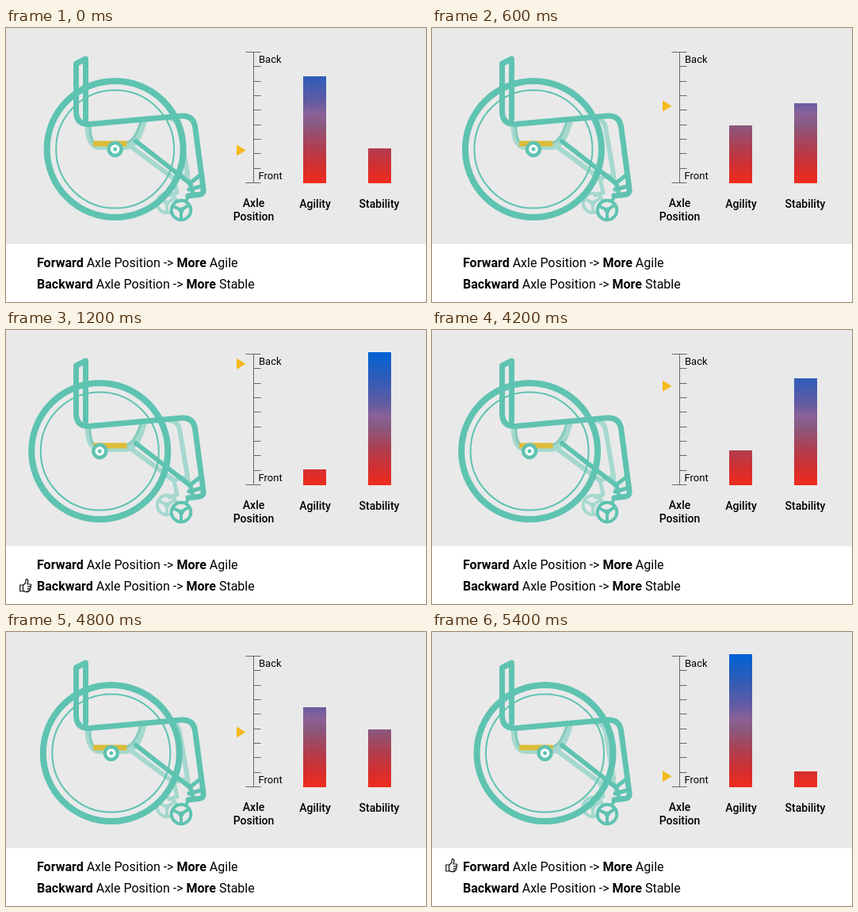
An HTML page that plays this animation: 530x346 px, repeating every 8.4 s.

```html
<!DOCTYPE html>
<html lang="en">
<head>
<meta charset="utf-8">
<title>Axle position</title>
<style>
  html, body { margin: 0; width: 100%; height: 100%; overflow: hidden; background: #fff; }
  svg { display: block; width: 530px; height: 346px; font-family: Roboto, sans-serif; }
  .line { fill: none; stroke-linejoin: round; stroke-linecap: round; }
  .near { stroke: #5fc3b1; }
  .far { stroke: #a5d8ce; }
  .label { font-size: 14px; font-weight: 500; text-anchor: middle; }
  .scale { font-size: 13px; }
  .rule { font-size: 16px; }
  .rule tspan { font-weight: 700; }
</style>
</head>
<body>
<svg viewBox="0 0 530 346">
  <defs>
    <linearGradient id="heat" gradientUnits="userSpaceOnUse" x1="0" y1="28" x2="0" y2="196">
      <stop offset="0" stop-color="#0062d4"/>
      <stop offset=".2" stop-color="#315cb8"/>
      <stop offset=".38" stop-color="#605ba3"/>
      <stop offset=".48" stop-color="#8a6298"/>
      <stop offset=".57" stop-color="#8a587e"/>
      <stop offset=".74" stop-color="#b23d4d"/>
      <stop offset=".88" stop-color="#d42e2f"/>
      <stop offset="1" stop-color="#f02c1e"/>
    </linearGradient>
    <g id="castor" class="line" stroke-width="4">
      <circle r="12.3"/>
      <path d="M0 0V11M0 0L-10-5M0 0L9-6"/>
      <circle r="1.5"/>
    </g>
  </defs>

  <rect width="530" height="273" fill="#e9e9e9"/>

  <!-- far side of the chair -->
  <g class="line far" stroke-width="7">
    <path d="M103 121C103 139 107 150 118 150.5H150C163 150 170 135 174 118"/>
    <path d="M158 150L212 190" stroke-width="6"/>
    <path d="M206 114Q217 115 219 126L229 184" stroke-width="6"/>
    <path d="M212 190L229 185M212 190L216 208L206 211M229 185L232 200" stroke-width="5"/>
    <use href="#castor" x="203" y="221"/>
  </g>
  <path d="M106 124C106 137 109 146 115 146H149C160 145 166 132 170 118" class="line" stroke="#83cbbd" stroke-width="3"/>
  <rect x="110" y="142.5" width="42.5" height="7" fill="#dcbc39"/>

  <g id="wheel" class="line near">
    <circle cy="153" r="86" stroke-width="8"/>
    <circle cy="153" r="74.5" stroke-width="2"/>
    <circle cy="153" r="8" stroke-width="4.5" fill="#fff"/>
    <circle cy="153" r="2.5" fill="#5fc3b1" stroke="none"/>
  </g>

  <!-- near side of the chair -->
  <g class="line near" stroke-width="7">
    <path d="M100.5 115V39L88.5 45V106Q89 122 105 121.5L221 111Q236 110 238.5 124L249 203Q250 210 243 210.5L230 212"/>
    <path d="M164 143L232 196" stroke-width="6"/>
    <path d="M232 196L246 185M231 204L246 200M233 196L236 210" stroke-width="5"/>
    <path d="M231 211L221 230" stroke-width="4"/>
    <circle cx="221" cy="230" r="12" fill="#e9e9e9" stroke="none"/>
    <use href="#castor" x="221" y="230"/>
  </g>

  <path id="ticks" fill="none" stroke="#666"/>
  <path id="arrow" d="M291-7L302.5 0L291 7Z" fill="#f5b81c"/>
  <g class="scale"><text x="319" y="44">Back</text><text x="318.5" y="191">Front</text></g>

  <rect id="agility" x="375" width="29" fill="url(#heat)"/>
  <rect id="stability" x="457" width="29" fill="url(#heat)"/>
  <g class="label">
    <text x="312.5" y="226">Axle</text><text x="312.5" y="243">Position</text>
    <text x="390" y="227">Agility</text><text x="471" y="227">Stability</text>
  </g>

  <g class="rule">
    <text x="39" y="302"><tspan>Forward</tspan> Axle Position -&gt; <tspan>More</tspan> Agile</text>
    <text x="39" y="329"><tspan>Backward</tspan> Axle Position -&gt; <tspan>More</tspan> Stable</text>
  </g>
  <g id="thumb" class="line" stroke="#111" stroke-width="1.2">
    <path d="M17.7 8H21.5V16H17.7ZM21.5 8.5L25 5V1.5Q25 .6 26 .7Q28.3 1.2 27.7 4L27 7H30.5Q32 7.3 31.7 8.7Q31.4 9.9 30 9.9Q31.8 10.2 31.3 11.6Q31 12.6 29.5 12.6Q31 13 30.4 14.2Q30 15 28.7 15Q29.5 16.5 27.8 16.6H24.5L21.5 15.3M27.5 9.9H30M27.3 12.6H29.5M27 15H28.7"/>
  </g>
</svg>
<script>
const el = id => document.getElementById(id);
const barTops = [28, 61, 95, 123, 152, 176];
const LAST = barTops.length - 1, STEP = 300, LOOP = 8400;

let ticks = "M312.5 30V196M302.5 30.5H321.5M302.5 195.5H321.5";
for (let i = 1; i < 9; i++) ticks += `M312.5 ${Math.round(30 + i * 18.33) + .5}h9`;
el("ticks").setAttribute("d", ticks);

// Axle notch: 0 is fully forward, LAST is fully backward.
function axleNotch(t) {
  if (t < 1200) return 1 + Math.floor(t / STEP);
  if (t < 4200) return LAST;
  if (t < 5400) return LAST - 1 - Math.floor((t - 4200) / STEP);
  return 0;
}

function move(id, x, y) {
  el(id).setAttribute("transform", `translate(${x} ${y})`);
}

function setBar(id, top) {
  el(id).setAttribute("y", top);
  el(id).setAttribute("height", 196 - top);
}

function draw(now) {
  const notch = axleNotch(now % LOOP);
  move("wheel", 142.5 - 4.85 * notch, 0);
  move("arrow", 0, 182.3 - 27.9 * notch);
  setBar("agility", barTops[notch]);
  setBar("stability", barTops[LAST - notch]);
  move("thumb", 0, notch ? 314 : 286);
  el("thumb").style.display = notch % LAST ? "none" : "";
}

const start = performance.now();
function tick() {
  draw(performance.now() - start);
  requestAnimationFrame(tick);
}
tick();
</script>
</body>
</html>
```
